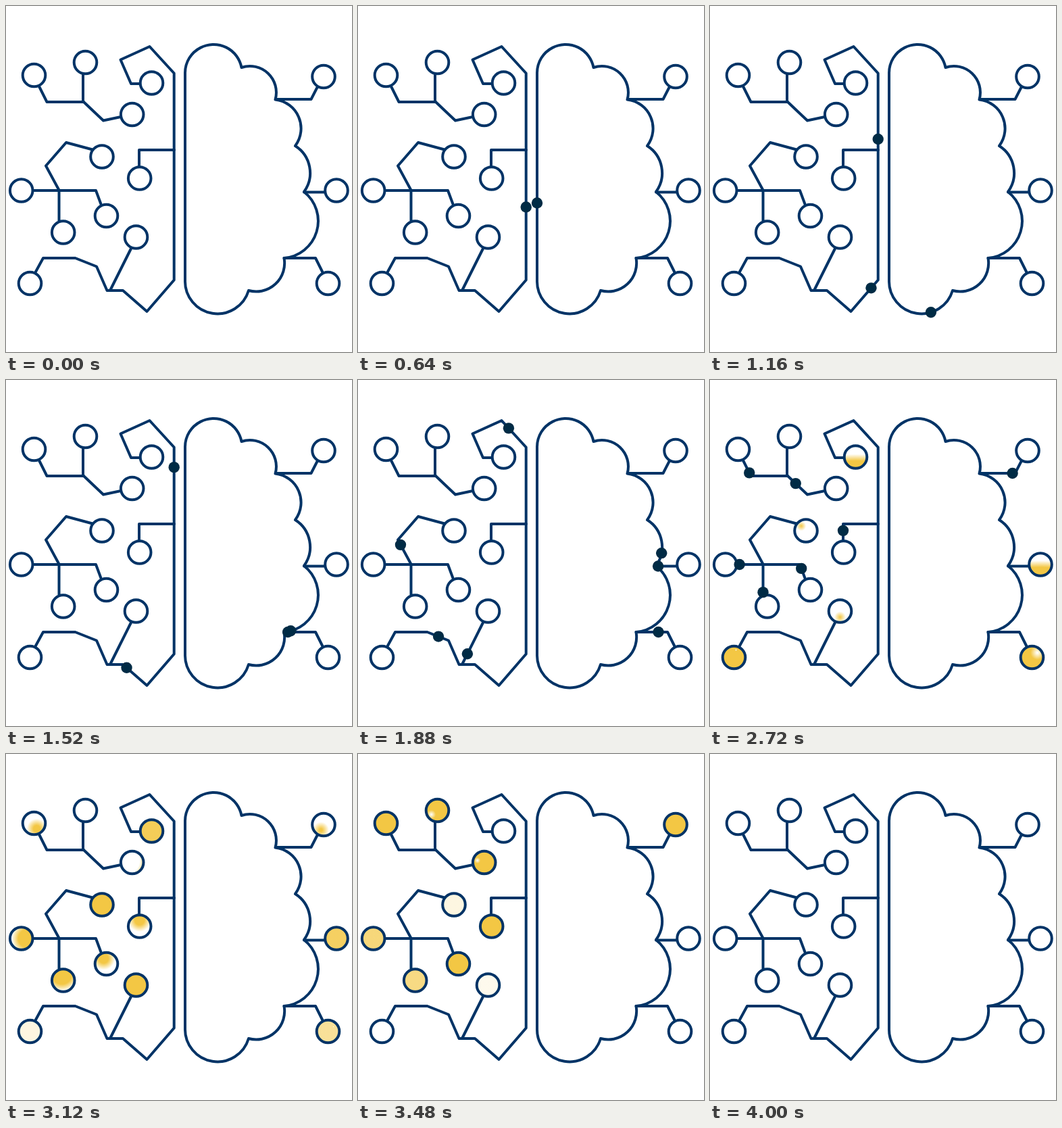
Write an HTML page that moves like this. It is 512 px wide and 512 px high and loops after 4040 ms.

```html
<!DOCTYPE html>
<html lang="en">
<head>
<meta charset="utf-8">
<title>Brain circuit</title>
<style>
html, body { margin: 0; width: 100%; height: 100%; overflow: hidden; background: #fff; }
svg { display: block; width: 100%; height: 100%; }
.line { fill: none; stroke: #003366; stroke-width: 4; stroke-linejoin: round; stroke-linecap: round; }
.dot { fill: #002b45; }
</style>
</head>
<body>
<svg viewBox="0 0 512 512"></svg>
<script>
const LOOP = 4040, STEP = 40;
const FILL = 480, HOLD = 600, DONE = 910; // ms after a pulse reaches its node
const SOFT = 10, INNER = 15, YELLOW = '#f3c744';
const svg = document.querySelector('svg');

const brain = `M288 61.6A42 42 0 0 0 265 99V406A48 48 0 0 0 359 421
  A42 42 0 0 0 411.5 373A55 55 0 0 0 441 275A47.5 47.5 0 0 0 428 207
  A43 43 0 0 0 398.5 138.5A39 39 0 0 0 348.5 91A42 42 0 0 0 288 61.6Z`;

// wire, node centre, departure, arrival, glow seed offset, seed is the last white spot
const wires = [
  ['M248.7 213V405.5L208.5 452 173 421H149.5L134 385.5 102.5 373H55L43 395', 35.5, 410.5, 285, 2260, 3, -11, true],
  ['M248.7 213V99.5L212.5 60 169.5 79.5 185 115H198', 215.5, 114, 1075, 2487, 0, 200],
  ['M248.7 213H197V238', 197.7, 255, 2070, 2880, 0, -9],
  ['M154 421L185.5 358', 192.5, 342, 1640, 2600, 0, 9],
  ['M78.5 272.5L59 236.5 89 202 128 212.5', 142, 223, 1625, 2620, -7, -7],
  ['M78.5 273H40', 22.7, 273, 2050, 2790, 9, 0],
  ['M78.5 273V318', 84.7, 335, 2135, 2775, -2, -9],
  ['M78.5 273H133L141 294.5', 148.5, 310.5, 2135, 2880, -4, -8],
  ['M115 142H60.5L49 119', 41.5, 102.5, 2170, 2910, 4, 8],
  ['M114 142V101', 117.5, 83.5, 2730, 3090, -9, 6, true],
  ['M115 142L144 169.5 170 164', 186.7, 160.5, 2611, 3060, -10, -3, true],
  ['M399 138H451.5L461 119.5', 470, 104.5, 2267, 2950, -4, 8],
  ['M441 275.5H472', 489, 273, 1815, 2470, 0, 200],
  ['M411.5 373H458L469 395', 476.5, 410.5, 1446, 2380, 8, -7, true]
];

function add(tag, attrs, parent = svg) {
  const el = document.createElementNS('http://www.w3.org/2000/svg', tag);
  set(el, attrs);
  return parent.appendChild(el);
}
function set(el, attrs) {
  for (const k in attrs) el.setAttribute(k, attrs[k]);
}

function makePulse(d, start, end) {
  const path = add('path', { d, class: 'line' });
  return { path, start, end, length: path.getTotalLength() };
}

function makeNode(cx, cy, start, dx, dy, hole, id) {
  const gradient = add('radialGradient', { id, gradientUnits: 'userSpaceOnUse', cx: cx + dx, cy: cy + dy });
  const stop = alpha => add('stop', { 'stop-color': YELLOW, 'stop-opacity': alpha }, gradient);
  const inner = stop(hole ? 0 : 1);
  set(stop(hole ? 1 : 0), { offset: 1 });
  const disc = add('circle', { cx, cy, r: 16, fill: `url(#${id})` });
  add('circle', { cx, cy, r: 16.8, class: 'line' });
  return { gradient, inner, disc, start, hole, dist: Math.hypot(dx, dy) };
}

const pulses = [makePulse(brain, 36, 2664)];
const nodes = wires.map(([d, cx, cy, start, end, dx, dy, hole], i) => {
  pulses.push(makePulse(d, start, end));
  return makeNode(cx, cy, end, dx, dy, hole, 'glow' + i);
});
for (const p of pulses) p.dot = add('circle', { r: 8.2, class: 'dot' });

function drawPulse({ path, start, end, length, dot }, t) {
  const k = (t - start) / (end - start);
  const on = k >= 0 && k < 1;
  dot.style.display = on ? '' : 'none';
  if (!on) return;
  const { x, y } = path.getPointAtLength(k * length);
  set(dot, { cx: x, cy: y });
}

function drawNode({ gradient, inner, disc, start, hole, dist }, t) {
  const age = t - start;
  const on = age > 0 && age < DONE;
  disc.style.display = on ? '' : 'none';
  if (!on) return;
  const p = Math.min(1, age / FILL);
  const low = Math.max(0, dist - INNER);
  const r = Math.max(0.01, low + (hole ? 1 - p : p) * (dist + INNER + SOFT - low));
  set(gradient, { r });
  set(inner, { offset: Math.max(0, 1 - SOFT / r) });
  disc.style.opacity = Math.min(1, (DONE - age) / (DONE - HOLD));
}

function frame() {
  const t = Math.floor(performance.now() % LOOP / STEP) * STEP;
  pulses.forEach(p => drawPulse(p, t));
  nodes.forEach(n => drawNode(n, t));
  requestAnimationFrame(frame);
}
frame();
</script>
</body>
</html>
```
